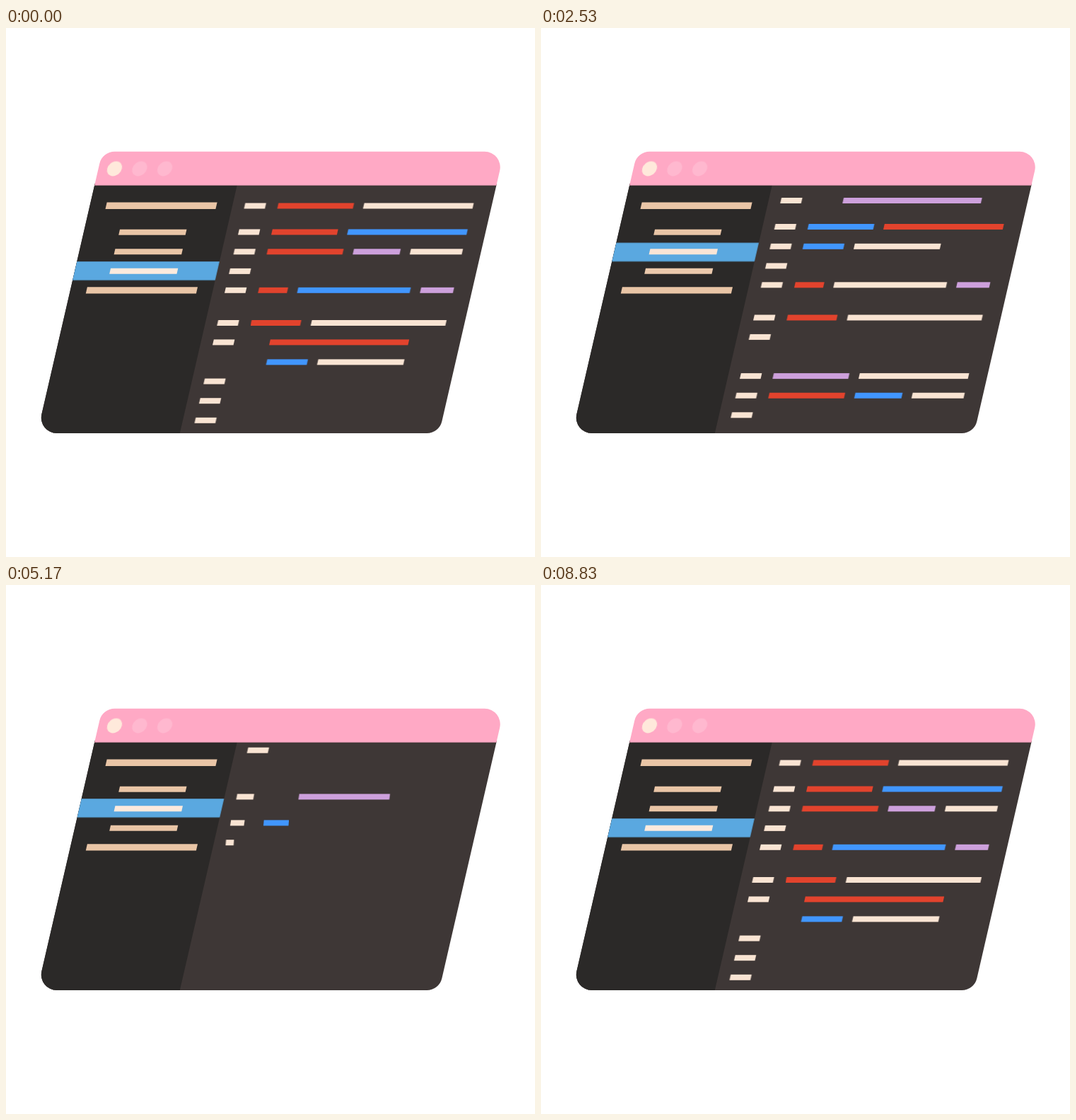
An HTML page for the animation above (8.86 s loop, 748 by 748 pixels).

```html
<!DOCTYPE html>
<html lang="en">
<head>
<meta charset="utf-8">
<title>Code editor</title>
<style>
  html, body { margin: 0; width: 100%; height: 100%; overflow: hidden; background: #fff; }
  svg { display: block; width: 100vw; height: 100vh; }

  :root {
    --cycle: 4430ms;
    --peach: #e9c5a6;
    --lit: #fdeadd;
  }
  .page, .mark, .item { animation: var(--cycle) linear infinite; }
  #pageA { animation-name: scrollA; }
  #pageB { animation-name: scrollB; }
  .mark { animation-name: mark; }
  .item { fill: var(--peach); }
  .itemA { animation-name: litA; }
  .itemB { animation-name: litB; }
  .bar { animation: grow var(--cycle) linear infinite; }

  /* pages slide along the slant of the window */
  @keyframes scrollA {
    0% { transform: translate(0, 0); }
    5.576% { transform: translate(0, 0); animation-timing-function: cubic-bezier(.3333, 0, .6667, 1); }
    19.977%, 35% { transform: translate(85.2px, -369px); }
    35.01% { transform: translate(-85.2px, 369px); }
    55.914% { transform: translate(-85.2px, 369px); animation-timing-function: cubic-bezier(.3333, 0, .6667, 1); }
    70.316%, 100% { transform: translate(0, 0); }
  }
  @keyframes scrollB {
    0% { transform: translate(-85.2px, 369px); }
    5.576% { transform: translate(-85.2px, 369px); animation-timing-function: cubic-bezier(.3333, 0, .6667, 1); }
    19.977% { transform: translate(0, 0); }
    55.914% { transform: translate(0, 0); animation-timing-function: cubic-bezier(.3333, 0, .6667, 1); }
    70.316%, 85% { transform: translate(85.2px, -369px); }
    85.01%, 100% { transform: translate(-85.2px, 369px); }
  }
  @keyframes mark {
    0% { transform: translateY(28px); }
    5.576% { transform: translateY(28px); animation-timing-function: cubic-bezier(.3333, 0, .6667, 1); }
    14.605% { transform: translateY(0); }
    55.914% { transform: translateY(0); animation-timing-function: cubic-bezier(.3333, 0, .6667, 1); }
    64.944%, 100% { transform: translateY(28px); }
  }
  @keyframes litA {
    0%, 5.576% { fill: var(--lit); }
    14.605%, 55.914% { fill: var(--peach); }
    64.944%, 100% { fill: var(--lit); }
  }
  @keyframes litB {
    0%, 5.576% { fill: var(--peach); }
    14.605%, 55.914% { fill: var(--lit); }
    64.944%, 100% { fill: var(--peach); }
  }
  /* typed in, held until its page has left, then emptied */
  @keyframes grow {
    0% { transform: scaleX(0); animation-timing-function: cubic-bezier(.165, .84, .44, 1); }
    10.95%, 65% { transform: scaleX(1); }
    65.01%, 100% { transform: scaleX(0); }
  }
</style>
</head>
<body>
<svg viewBox="0 0 748 748">
  <defs>
    <clipPath id="win">
      <path d="M50.4 546.1A22 22 0 0 0 71.8 573H595A22 22 0 0 0 616.4 555.9L698.2 201.7A22 22 0 0 0 676.8 174.8H153.6A22 22 0 0 0 132.2 191.9Z"/>
    </clipPath>
  </defs>
  <g clip-path="url(#win)">
    <g transform="matrix(1 0 -.2309 1 132.3 0)">
      <rect x="40" y="220" width="580" height="360" fill="#3e3736"/>
      <rect x="40" y="220" width="205.8" height="360" fill="#2b2928"/>
      <rect class="mark" x="40" y="302.2" width="205.8" height="26.5" fill="#5aa8e0"/>
    </g>
    <g id="side"></g>
    <g class="page" id="pageA"></g>
    <g class="page" id="pageB"></g>
    <g transform="matrix(1 0 -.2309 1 132.3 0)">
      <rect x="40" y="170" width="580" height="52.6" fill="#ffa9c5"/>
      <circle cx="67.1" cy="199" r="10.4" fill="#ffe9db"/>
      <circle cx="102.6" cy="199" r="10.4" fill="#ffb8cf"/>
      <circle cx="138.2" cy="199" r="10.4" fill="#ffb8cf"/>
    </g>
  </g>
</svg>
<script>
const SLANT = 0.2309, CYCLE = 4430, STEP = 60.6;
const COLORS = { c: '#f9e4d3', r: '#e2432d', b: '#4196ff', p: '#cda0dc' };
const ROWS = [251.5, 288.5, 316.3, 343.9, 370.8, 417, 444.4, 472.4, 499.6, 527.2, 554.8];
const NUMBERED = [0, 1, 2, 3, 4, 5, 6, 8, 9, 10];

// each bar: colour, left, right
const PAGE_A = {
  0: [['r', 383.5, 492.3], ['c', 504.7, 661.4]],
  1: [['r', 375, 469.7], ['b', 482.2, 652.9]],
  2: [['r', 368.5, 477.5], ['p', 490.2, 558.2], ['c', 570.8, 646.2]],
  4: [['r', 356.2, 399], ['b', 411.5, 572.5], ['p', 585.2, 633.7]],
  5: [['r', 345.5, 417.7], ['c', 430.7, 623]],
  6: [['r', 372, 570.2]],
  7: [['b', 367.6, 427], ['c', 439.7, 563.5]]
};
const PAGE_B = {
  0: [['p', 424.5, 622]],
  1: [['b', 375, 469.7], ['r', 482.2, 652.9]],
  2: [['b', 368, 427.4], ['c', 440.2, 563.9]],
  4: [['r', 356.2, 399], ['c', 411.5, 572.5], ['p', 585.2, 633.7]],
  5: [['r', 345.5, 417.7], ['c', 430.7, 623]],
  8: [['p', 325.6, 434.5], ['c', 447.2, 603.7]],
  9: [['r', 319.5, 428.5], ['b', 441, 509.6], ['c', 522, 597.5]]
};

function node(name, attrs, parent) {
  const el = document.createElementNS('http://www.w3.org/2000/svg', name);
  for (const key in attrs) el.setAttribute(key, attrs[key]);
  return parent.appendChild(el);
}

// slanted bar centred on y, with its left edge at its own origin
function bar(parent, cls, left, right, y, h = 8) {
  const w = right - left, s = h * SLANT;
  const spot = node('g', { transform: `translate(${left} ${y - h / 2})` }, parent);
  return node('path', { class: cls, d: `M${s} 0H${w}L${w - s} ${h}H0Z` }, spot);
}

function typed(parent, color, left, right, row, start) {
  const el = bar(parent, 'bar', left, right, ROWS[row]);
  el.setAttribute('fill', COLORS[color]);
  el.style.animationDelay = `${start - CYCLE}ms`;
}

function buildPage(id, lines, numberStart, codeStart) {
  const page = document.getElementById(id);
  NUMBERED.forEach((row, i) => {
    const x = 336.5 - SLANT * (ROWS[row] - ROWS[0]);
    typed(page, 'c', x, x + 31.4, row, numberStart + i * STEP);
  });
  let i = 0;
  for (const row in lines) {
    for (const [color, left, right] of lines[row]) {
      typed(page, color, left, right, row, codeStart + i++ * STEP);
    }
  }
}

const side = document.getElementById('side');
bar(side, 'item', 140.5, 298.6, 251.2, 9.4);
bar(side, 'item', 159.2, 255.5, 288.7);
bar(side, 'item itemB', 152.6, 250, 316.3);
bar(side, 'item itemA', 146.2, 243.3, 343.7);
bar(side, 'item', 112.8, 271, 370.8, 9.2);

buildPage('pageA', PAGE_A, 2657, 2657);
buildPage('pageB', PAGE_B, 572, 633);
</script>
</body>
</html>
```
